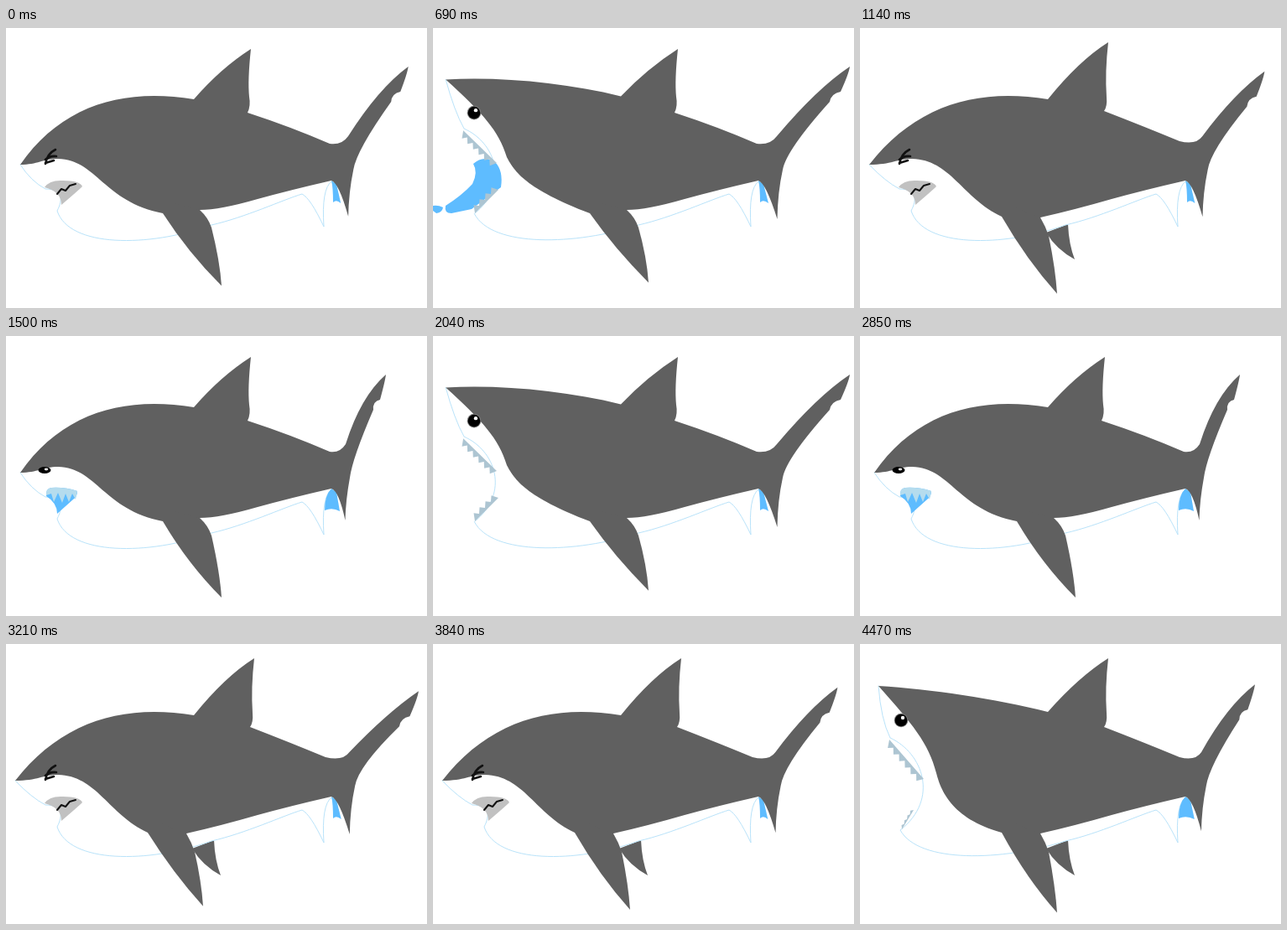
An HTML page with a canvas that plays this animation: 502 by 334 pixels, repeating every 4500 ms.

```html
<!DOCTYPE html>
<html lang="en">
<head>
<meta charset="utf-8">
<title>Shark</title>
<style>
  html, body { margin: 0; width: 100%; height: 100%; overflow: hidden; background: #fff; }
  canvas { display: block; }
</style>
</head>
<body>
<canvas id="stage" width="502" height="334"></canvas>
<script>
const ctx = document.getElementById('stage').getContext('2d');
const GREY = '#606060', WATER = '#5ebcff', EDGE = '#b9e3fa', TOOTH = '#adc5d2';
const LOOP = 4500, STEP = 90, SWIM = 7.5, START = .25;

const mix = (a, b, k) => a.map((v, i) => v + (b[i] - v) * k);

function ease(v, from, to) {
  const k = Math.min(1, Math.max(0, (v - from) / (to - from)));
  return k * k * (3 - 2 * k);
}

// Rises from a to b, falls from c to d
const pulse = (v, a, b, c, d) => ease(v, a, b) - ease(v, c, d);

// Swim phase, from START to START + 1, advancing in held steps
function phaseAt(t) {
  if (t < 30) return 1.19;
  const n = t < 150 ? 1 : Math.floor((t - 150) / STEP) + 2;
  return (n / SWIM - START + 1) % 1 + START;
}

function poseAt(p) {
  const tail = pulse(p, .5, .88, 1.13, 1.27);
  const roll = pulse(p, .27, .53, .82, 1);
  const jaw = pulse(p, .28, .48, .668, .73) + pulse(p, .82, .95, 1.04, 1.175);
  return {
    tail, roll, jaw,
    squint: p < .4 || p > .82 && p < 1,
    tip: [453 + 44 * tail, 46 + 13 * roll * tail * tail],
    fin: [257 - 22 * roll, 313.5 + 10 * Math.cos(2 * Math.PI * (p - .54))],
    nose: [17 - 6 * roll + jaw * (13 * roll - 2), 163 - 113 * jaw],
    gap: 380 + 10 * ease(tail, .42, .6)
  };
}

function fill(color, d) {
  ctx.fillStyle = color;
  ctx.fill(new Path2D(d));
}

function line(color, width, d) {
  ctx.strokeStyle = color;
  ctx.lineWidth = width;
  ctx.stroke(new Path2D(d));
}

function dot(color, x, y, rx, ry = rx) {
  ctx.fillStyle = color;
  ctx.beginPath();
  ctx.ellipse(x, y, rx, ry, 0, 0, 7);
  ctx.fill();
}

// Row of triangular teeth along a segment
function teeth(x1, y1, x2, y2, n, h) {
  const dx = x2 - x1, dy = y2 - y1, len = Math.hypot(dx, dy);
  const at = (k, out) => `L${x1 + dx * k - dy / len * out},${y1 + dy * k + dx / len * out}`;
  let d = `M${x1},${y1}`;
  for (let i = 0; i < n; i++) {
    d += at((i + .6) / n, h) + at((i + 1) / n, i < n - 1 ? h * .35 : 0);
  }
  fill(TOOTH, d + 'Z');
}

function drawMouth({ jaw, roll, squint }, lip) {
  if (jaw > .15) {
    const near = 1 - roll;
    teeth(lip[0] - 1, lip[1] + 2, 76, 161, 6, 8);
    teeth(50, 221, 64 + 14 * near, 198 - 5 * near, 4, -3 - 5 * near);
  } else if (squint) {
    fill(WATER, 'M48,191 Q47,182 54,181 Q70,180 85,185 Q85,192 80,195 L61,212 Q61,199 48,191Z');
    fill('#b5dcee', 'M48,190 Q47,182 54,181 Q70,180 85,185 L83,195 L79,188 L75,198 L71,188 L67,199 L62,187 L57,198 L54,188Z');
  } else {
    fill('#c1c1c1', 'M46,190 Q52,181 68,182 Q88,182 91,189 Q86,194 66,211 Q66,195 46,190Z');
    line('#111', 2, 'M61,198 L66,192 L71,194 L76,188 L83,186');
  }
}

function drawEye({ jaw, squint }) {
  if (jaw > .15) {
    const y = 191 - 100 * jaw;
    dot('#777', 49, y, 8.3);
    dot('#000', 49, y, 7.3);
    dot('#fff', 51, y - 3, 2.2);
  } else if (squint) {
    dot('#000', 46, 160, 7.5, 4);
    dot('#ddd', 48, 159, 2.3, 1.4);
  } else {
    line('#111', 2.6, 'M47,162 Q49,150 59,145 M47,157 Q52,152 60,153 M47,161 L57,158');
  }
}

function draw(t) {
  const pose = poseAt(phaseAt(t));
  const { tail, roll, jaw, tip, fin, nose, gap } = pose;
  const [tx, ty] = tip;
  const byJaw = (a, b) => mix(a, b, jaw), byRoll = (a, b) => mix(a, b, roll);
  const lip = byJaw([47, 192], [36, 112]);
  const chin = byJaw([61, 218], [48, 222]);
  const cheek = byJaw([62, 156], [91, 154]);
  const root = byRoll([187, 221], [169, 225]);
  const rear = byRoll([231, 217], [215, 226]);

  ctx.fillStyle = '#fff';
  ctx.fillRect(0, 0, 502, 334);
  ctx.lineCap = ctx.lineJoin = 'round';

  // far fin, shown only while rolled over
  if (roll > .2) {
    fill(GREY, `M222,244 Q234,264 ${byRoll([240, 238], [256, 276])} Q249,258 248,234Z`);
  }

  // pale underside
  const under = `M${nose} Q${byJaw([30, 183], [25, 90])} ${lip}
    C${byJaw([68, 192, 68, 205], [75, 130, 95, 185])} ${chin}
    C${byJaw([75, 262, 170, 262], [70, 262, 170, 259])} 245,235
    C285,226 330,205 353,198 Q363,203 379,237 Q376,192 388,183`;
  fill('#fff', `${under} L${rear} L${root} L${cheek}Z`);
  line(EDGE, 1, under);

  // water behind the tail
  fill(WATER, `M388,182 L394,186 L${398 + 2 * tail},209 Q${(gap + 398) / 2},204 ${gap},208 Q${gap},190 388,182Z`);

  // back, dorsal fin, tail and face edge
  fill(GREY, `M${nose} C${byJaw([66, 92, 140, 71], [85, 54, 160, 65])} ${byJaw([224, 85], [224, 81])}
    Q${byRoll([256, 48], [261, 39])} ${byRoll([292, 25], [296, 17])}
    Q${byRoll([288, 62], [292, 52])} ${byRoll([290, 82], [294, 82])}
    Q${byRoll([292, 93], [295, 94])} ${byRoll([288, 101], [291, 99])}
    Q340,118 ${byRoll([386, 138], [381, 135])}
    Q${398 + 4 * tail},140 ${405 + 5 * tail},129
    Q${tx - 30 - 9 * tail},${ty + 26} ${tip}
    Q${tx - 1},${ty + 8} ${tx - 7 - 4 * tail},${ty + 30}
    Q${tx - 16 - 6 * tail},${ty + 32} ${tx - 15 - 9 * tail},${ty + 42}
    Q${413 + 8 * tail},146 ${410 + 7 * tail},169
    Q${405 + 6 * tail},196 ${404.5 + 6 * tail},${220 + 8 * tail}
    Q397,185 388,182 Q340,193 300,204 Q255,217 ${rear} L${root}
    C${byJaw(byRoll([116, 207], [122, 203]), byRoll([110, 190], [108, 208]))}
    ${byJaw([108, 157], [96, 173])} ${cheek}
    C${byJaw([44, 156, 38, 163], [82, 118, 62, 95])} ${nose}Z`);

  // near fin, overlapping the body
  fill(GREY, `M${root} Q${root[0] + 30},${fin[1] - 40} ${fin}
    Q${fin[0] - 2},${fin[1] - 30} ${byRoll([245, 238], [225, 248])}
    Q${byRoll([241, 226], [221, 236])} ${rear} L${root[0] + 14},${root[1] - 12}Z`);

  // splash thrown from the mouth
  if (t >= 690 && t < 780) {
    fill(WATER, 'M81,190 Q84,170 74,160 Q60,151 48,162 Q54,172 47,186 Q34,200 15,212 Q13,221 22,221 L46,216Z');
    fill(WATER, 'M0,212 Q6,211 12,214 Q11,220 4,221 L0,218Z');
  }
  drawMouth(pose, lip);
  drawEye(pose);
}

function tick() {
  draw(performance.now() % LOOP);
  requestAnimationFrame(tick);
}
tick();
</script>
</body>
</html>
```
